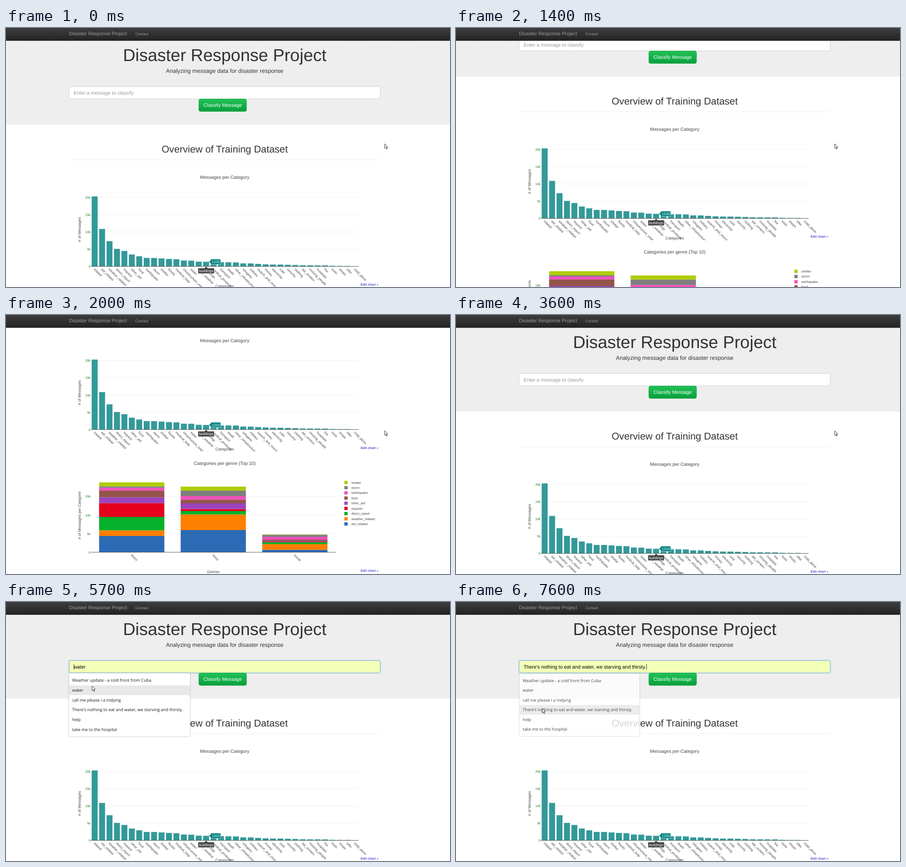
An HTML page that plays this animation: 980x572 px, repeating every 8 s.

```html
<!DOCTYPE html>
<html lang="en">
<head>
<meta charset="utf-8">
<title>Disaster Response Project</title>
<style>
  html, body { margin: 0; width: 100%; height: 100%; overflow: hidden; background: #fff; }
  svg { display: block; width: 980px; height: 572px; }
  text { font-family: "Liberation Sans", Arial, sans-serif; text-rendering: geometricPrecision; white-space: pre; }
  #menu text { font-family: "Open Sans", sans-serif; }
  #field.focus { stroke: #66a5e6; filter: drop-shadow(0 0 1.3px rgba(90, 160, 230, .75)); }
  #panel { filter: drop-shadow(0 .8px 1px rgba(0, 0, 0, .4)); }
</style>
</head>
<body>
<svg viewBox="0 0 980 572" xmlns="http://www.w3.org/2000/svg">
  <defs>
    <linearGradient id="nav" x2="0" y2="1"><stop stop-color="#3d3d3d"/><stop offset="1" stop-color="#232323"/></linearGradient>
    <linearGradient id="green" x2="0" y2="1"><stop stop-color="#22c157"/><stop offset="1" stop-color="#06a03d"/></linearGradient>
    <clipPath id="plot"><rect width="980" height="574.4"/></clipPath>
  </defs>
  <g id="page">
    <rect width="980" height="213.2" fill="#eee"/>
    <g id="head"></g>
    <rect id="field" x="139.3" y="129.2" width="686.8" height="27.3" rx="3.6" fill="#fff" stroke="#c8c8c8" stroke-width=".8"/>
    <rect x="425.7" y="156.8" width="105.2" height="27.4" rx="3.6" fill="url(#green)" stroke="#0b9a3c" stroke-width=".7"/>
    <g id="charts"></g>
    <g id="entry"></g>
    <path id="caret" stroke="#000" stroke-width=".8"/>
    <g id="menu"></g>
  </g>
  <rect width="980" height="28" fill="url(#nav)"/>
  <rect y="27.4" width="980" height=".8" fill="#111"/>
  <g id="bar"></g>
  <path id="arrow" d="M0 0V9.8L2.3 7.8 4 11.7 5.6 11 3.9 7.2H6.9Z" fill="#fff" stroke="#1a1a1a" stroke-width=".9" stroke-linejoin="round"/>
  <path id="beam" d="M-2 -5.2Q0 -5.2 0 -4.2 0 -5.2 2 -5.2M0 -4.5V4.5M-2 5.2Q0 5.2 0 4.2 0 5.2 2 5.2" fill="none" stroke="#222" stroke-width=".8"/>
</svg>
<script>
const SVG = 'http://www.w3.org/2000/svg';
const ZOOM = 0.6025;
const $ = id => document.getElementById(id);

function add(parent, tag, attrs, content) {
  const el = document.createElementNS(SVG, tag);
  for (const key in attrs) el.setAttribute(key, attrs[key]);
  if (content) el.textContent = content;
  return parent.appendChild(el);
}
const label = (parent, x, y, size, fill, content, more) =>
  add(parent, 'text', { x, y, fill, 'font-size': size * ZOOM, ...more }, content);
const box = (parent, x, y, width, height, fill, more) =>
  add(parent, 'rect', { x, y, width, height, fill, ...more });
const mid = { 'text-anchor': 'middle' };

// Page header
label($('bar'), 139, 16.4, 18, '#9d9d9d', 'Disaster Response Project');
label($('bar'), 285.2, 15.7, 14, '#9d9d9d', 'Contact');
label($('head'), 482.7, 73, 63, '#333', 'Disaster Response Project', mid);
label($('head'), 482.7, 99.4, 21, '#333', 'Analyzing message data for disaster response', mid);

// Charts
const charts = $('charts');
label(charts, 478.2, 174.4, 18, '#fff', 'Classify Message', mid);
label(charts, 482.7, 275, 36, '#333', 'Overview of Training Dataset', mid);
box(charts, 139, 290.7, 687, .7, '#e9e9e9');

function frame(base, right, step, count, title, yTitle, yMid, xTitle, xMid, shift) {
  for (let i = 0; i <= count; i++) {
    const y = base - i * step;
    if (i) box(charts, 187.5, y - .3, right - 187.5, .7, '#ebebeb');
    label(charts, 186.6, y + 2.7, 12, '#1a7f1a', i ? i * 5 + 'k' : '0', { 'text-anchor': 'end' });
  }
  label(charts, 482.7, 333.2 + shift, 17, '#444', title, mid);
  label(charts, 0, 0, 14, '#444', yTitle, { ...mid, transform: `translate(164.6 ${yMid}) rotate(-90)` });
  label(charts, xMid, 572.5 + shift, 14, '#444', xTitle, mid);
  label(charts, 782.7, 569.1 + shift, 12, '#5050d2', 'Edit chart »', { 'font-weight': 'bold' });
}
const slanted = (parent, x, base, name) =>
  label(parent, 0, 0, 12, '#444', name, { transform: `translate(${x - 2.5} ${base + 7.1}) rotate(45)` });
const axis = (base, right) => box(charts, 187.3, base - .5, right - 187.3, .9, '#444');

const CATEGORIES = {
  related: 20282, aid_related: 10860, weather_related: 7297, direct_report: 5075, request: 4474,
  other_aid: 3446, food: 2923, earthquake: 2455, storm: 2443, shelter: 2314, floods: 2155,
  medical_help: 2084, infrastructure_related: 1705, water: 1672, other_weather: 1376,
  buildings: 1333, medical_products: 1313, transport: 1201, death: 1194,
  other_infrastructure: 1151, refugees: 875, military: 860, search_and_rescue: 724, money: 604,
  electricity: 532, cold: 530, security: 471, clothing: 405, aid_centers: 309,
  missing_people: 298, hospitals: 283, fire: 282, tools: 159, shops: 120, offer: 118, child_alone: 0
};
const BASE1 = 526.5, PITCH = 16.4;
frame(BASE1, 778, 38.1, 4, 'Messages per Category', '# of Messages', 445, 'Categories', 482.7, 0);
const names = add(charts, 'g', { 'clip-path': 'url(#plot)' });
Object.entries(CATEGORIES).forEach(([name, n], i) => {
  const x = 187.5 + (i + .5) * PITCH, h = n * .00762;
  box(charts, x - PITCH * .4, BASE1 - h, PITCH * .8, h, '#339999');
  slanted(names, x, BASE1, name);
});
axis(BASE1, 778);

const tip = (d, fill) => add(charts, 'path', { d, fill, stroke: '#fff', 'stroke-width': .6 });
tip('M448 516.3L452 512.7V510.5H473.8V522.1H452V519.9Z', '#008080');
label(charts, 454.2, 519.1, 13, '#fff', '1333');
tip('M441.7 526.5L445.3 530.2H459.5V542.2H423.9V530.2H438.1Z', '#444');
label(charts, 441.7, 538.8, 13, '#fff', 'buildings', mid);

const SERIES = [
  ['aid_related', '#2b6ab5', 36, 49, 5.5], ['weather_related', '#ff7f00', 12.5, 34.5, 12.5],
  ['direct_report', '#05b02a', 29.5, 7.5, 4.5], ['request', '#e5001e', 30.6, 4.5, 1.5],
  ['other_aid', '#9b43be', 12.9, 12.5, 1.4], ['food', '#94544a', 14.8, 8.5, 2.6],
  ['earthquake', '#f24fbf', 6.2, 7.5, 6], ['storm', '#7f7f7f', 3.1, 12, 4.7],
  ['shelter', '#b0cc05', 8.7, 9, .8]
];
const BASE2 = 797.5;
frame(BASE2, 727.5, 41.1, 3, 'Categories per genre (Top 10)', '# of Messages per Caegorie', 716, 'Genres', 457.5, 271);
['direct', 'news', 'social'].forEach((genre, g) => {
  const x = 277.5 + g * 180;
  let y = BASE2;
  for (const [, fill, ...sizes] of SERIES) {
    y -= sizes[g];
    box(charts, x - 72, y, 144, sizes[g], fill);
  }
  slanted(charts, x, BASE2, genre);
});
axis(BASE2, 727.5);
SERIES.forEach(([name, fill], i) => {
  const y = 735 - i * 11.45;
  box(charts, 746.8, y - 3.6, 7.2, 7.2, fill);
  label(charts, 762.3, y + 2.6, 12, '#444', name);
});

// Suggestions
const ITEMS = [
  'Weather update - a cold front from Cuba', 'water', 'call me please i a mdying',
  "There's nothing to eat and water, we starving and thirsty.", 'help', 'take me to the hospital'
];
const ROW = 21.7, menu = $('menu');
box(menu, 138.8, 157, 267.6, 140, '#fff', { id: 'panel', rx: 1.5 });
const mark = box(menu, 138.8, 0, 267.6, ROW, '#e8e8eb');
ITEMS.forEach((item, i) =>
  add(menu, 'text', { x: 146, y: 176.3 + i * ROW, fill: '#1c1c1c', 'font-size': 9.25 }, item));
const entry = label($('entry'), 149.2, 146.8, 18, '#999', ' ');

// Tracks of [time in ms, value], each value holding until the next
const SCROLL = [[0, 0], [800, 10], [900, 33], [1100, 40.5], [1200, 60], [1300, 82], [1400, 106],
  [1500, 132], [1600, 158.5], [1700, 205], [1800, 250], [1900, 272.5], [2000, 273.5], [3600, 0]];
const ARROW = [[0, [835.9, 255.8]], [3800, [723.6, 215.4]], [4000, [176.4, 108.4]], [4300, [173.4, 124.4]],
  [4500, null], [5400, [336.8, 185]], [5700, [190.2, 185.8]], [5900, [189.6, 171]],
  [6100, [189.6, 178]], [6900, [192.6, 186]], [7100, [192, 212]], [7300, [190.3, 235]]];
const BEAM = [[0, false], [4500, true], [4700, false]];
const PICK = [[0, -1], [5400, 1], [5900, 0], [7100, 2], [7300, 3]];
const CARET = [[0, 0], [5100, 150], [5400, 0], [5700, 150], [6100, 0], [6600, 150], [7300, 0], [7600, 420.7]];
const OPEN = 5100, CLOSE = 7600, LOOP = 8000;

const at = (track, t) => track.findLast(([start]) => start <= t)[1];
const show = (el, on) => el.setAttribute('visibility', on ? 'visible' : 'hidden');

function draw(t) {
  $('page').setAttribute('transform', `translate(0 ${-at(SCROLL, t)})`);

  const pos = at(ARROW, t);
  show($('arrow'), pos);
  if (pos) $('arrow').setAttribute('transform', `translate(${pos})`);
  show($('beam'), at(BEAM, t));
  $('beam').setAttribute('transform', 'translate(168.5 138.5)');

  const pick = at(PICK, t), filled = pick >= 0;
  $('field').setAttribute('class', t >= OPEN ? 'focus' : '');
  $('field').setAttribute('fill', filled ? '#f2ffb6' : '#fff');
  entry.textContent = filled ? ITEMS[pick] : 'Enter a message to classify';
  entry.setAttribute('fill', filled ? '#000' : '#999');

  const caret = at(CARET, t);
  show($('caret'), caret);
  $('caret').setAttribute('d', `M${caret} 137V149`);

  show(menu, t >= OPEN);
  mark.setAttribute('y', 162.3 + pick * ROW);
  mark.setAttribute('opacity', filled ? 1 : 0);
  menu.setAttribute('opacity', t >= CLOSE ? .8 : 1);
  menu.setAttribute('transform', t >= CLOSE ? 'translate(272.6 230) scale(.99) translate(-272.6 -230)' : '');
}

const begin = performance.now();
function tick() {
  draw((performance.now() - begin) % LOOP);
  requestAnimationFrame(tick);
}
tick();
</script>
</body>
</html>
```
